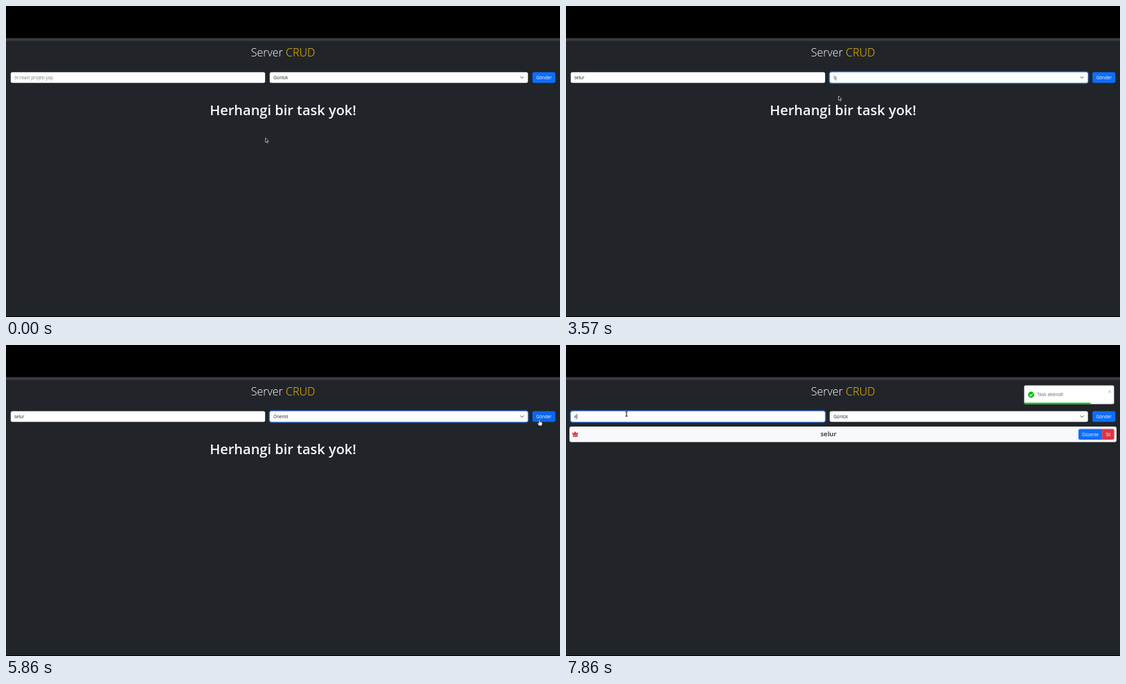
Animation, 800 px wide and 450 px high, one loop 8 s. Source, as an HTML page:

```html
<!DOCTYPE html>
<html lang="tr">
<head>
<meta charset="utf-8">
<title>Server CRUD</title>
<style>
  html, body { margin: 0; width: 100%; height: 100%; overflow: hidden; background: #000; }
  svg { display: block; width: 100vw; height: 100vh; }
  text { font: 400 6.25px "Open Sans", "Noto Sans", sans-serif; fill: #212529; }
  .title { font-size: 16px; font-weight: 300; fill: #fff; }
  .gold { fill: #ffc107; }
  .empty { font-size: 20px; font-weight: 600; fill: #f8f9fa; }
  .task { font-size: 9.6px; font-weight: 600; }
  .light { fill: #fff; }
  .toast { font: 6.6px "Liberation Sans", Arial, sans-serif; fill: #757575; }
  .mid { text-anchor: middle; }
  .ring rect { fill: none; }
  .glow { stroke: #0d6efd; stroke-opacity: .42; stroke-width: 1.8; }
  .edge { stroke: #86b7fe; stroke-width: .6; }
</style>
</head>
<body>
<svg viewBox="0 0 800 450">
  <rect width="800" height="450"/>
  <rect y="46.5" width="800" height="4.5" fill="#3b3a40"/>
  <rect y="50.5" width="800" height="398.5" fill="#212529"/>
  <text class="title mid" x="400" y="73">Server <tspan class="gold">CRUD</tspan></text>

  <g id="inputRing" class="ring">
    <rect class="glow" x="6" y="95" width="369" height="17" rx="3.4"/>
  </g>
  <rect x="6.8" y="95.7" width="367.4" height="15.6" rx="2.5" fill="#fff"/>
  <rect id="inputEdge" class="edge" x="6.9" y="95.8" width="367.2" height="15.4" rx="2.4" fill="none"/>
  <text id="field" x="12" y="105.8"></text>
  <rect id="caret" y="99.6" width=".7" height="7.8" fill="#212529"/>

  <g id="selectRing" class="ring">
    <rect class="glow" x="380" y="95" width="374.5" height="17" rx="3.4"/>
  </g>
  <rect x="380.8" y="95.7" width="372.9" height="15.6" rx="2.5" fill="#fff"/>
  <rect id="selectEdge" class="edge" x="380.9" y="95.8" width="372.7" height="15.4" rx="2.4" fill="none"/>
  <text id="choice" x="386.3" y="105.8"></text>
  <path d="M742.9 102.4l2.2 2.2 2.2-2.2" fill="none" stroke="#343a40" stroke-width=".9" stroke-linecap="round" stroke-linejoin="round"/>

  <rect id="send" x="760.2" y="95.7" width="33.2" height="15.6" rx="2.5"/>
  <text class="light mid" x="776.8" y="105.8">Gönder</text>

  <text id="empty" class="empty mid" x="400" y="158">Herhangi bir task yok!</text>

  <g id="row">
    <rect x="5" y="118" width="790" height="22.4" rx="3" fill="#f8f9fa"/>
    <path d="M9 126.2l2.3 1.6 1.9-3.1 1.9 3.1 2.5-1.6-.8 4.3H9.8zM9.8 131.1h7.1v1.6H9.8z" fill="#dc3545"/>
    <text class="task mid" x="379" y="131.8">selur</text>
    <path d="M774.2 121.5v15.6h-31.7a2.5 2.5 0 0 1-2.5-2.5v-10.6a2.5 2.5 0 0 1 2.5-2.5z" fill="#0d6efd"/>
    <path d="M774.2 121.5v15.6h15a2.5 2.5 0 0 0 2.5-2.5v-10.6a2.5 2.5 0 0 0-2.5-2.5z" fill="#dc3545"/>
    <text class="light mid" x="757.2" y="131.6">Düzenle</text>
    <text class="light mid" x="782.8" y="131.6">Sil</text>
  </g>

  <g id="toast">
    <rect x="661.6" y="58.6" width="129.8" height="26.9" rx="2" fill="#fff"/>
    <circle cx="671.6" cy="72" r="4.4" fill="#07bc0c"/>
    <path d="M669.4 72.1l1.6 1.6 2.9-3.2" fill="none" stroke="#fff" stroke-width="1.1"/>
    <text class="toast" x="680" y="74.3">Task eklendi!</text>
    <path d="M783.2 65.7l3.6 3.6m0-3.6l-3.6 3.6" stroke="#a5a5a5" stroke-width=".8"/>
    <rect id="bar" x="661.8" y="83.5" height="2" fill="#07bc0c"/>
  </g>

  <g id="arrow">
    <path d="M0 0v6.5l1.5-1.3 1 2.2 1.1-.5-1-2.1h2z" fill="#111" stroke="#fff" stroke-width=".6"/>
  </g>
  <g id="beam">
    <path d="M-1.6-3.2H1.6M0-3.2V3.2M-1.6 3.2H1.6" fill="none" stroke="#999" stroke-width="1.7"/>
    <path d="M-1.6-3.2H1.6M0-3.2V3.2M-1.6 3.2H1.6" fill="none" stroke="#333" stroke-width=".7"/>
  </g>
  <g id="hand">
    <path d="M-.7.5Q0-.4.7.5V3L3.6 3.8Q4.3 4.2 4 5.6L3.2 8.4H-.6L-2.6 5.4Q-2.7 4.2-1.7 4.5L-.7 5.4Z" fill="#fff" stroke="#222" stroke-width=".45"/>
  </g>
</svg>
<script>
const LOOP = 8000, FPS = 7;
const $ = id => document.getElementById(id);
const show = (id, on) => $(id).setAttribute('display', on ? 'inline' : 'none');
const place = (id, x, y) => $(id).setAttribute('transform', `translate(${x} ${y})`);

// Pointer stops: time, x, y
const path = [
  [0, 374.7, 190.8], [290, 374.7, 190.8], [860, 150, 107], [1290, 143.5, 110.5],
  [2150, 143.5, 110.5], [2430, 170, 138], [2720, 260, 222], [3000, 386, 106],
  [3140, 388, 106], [3430, 393.5, 130], [3720, 393.5, 130], [4000, 440, 132],
  [4420, 490.8, 119.6], [4700, 506, 105], [4860, 508, 106], [5140, 515, 138],
  [5290, 515, 138], [5720, 770.3, 108.3], [6000, 770.3, 108.3],
  [6600, 86, 100], [6700, 81.8, 98.2], [7140, 81.8, 98.2], [7700, 87.4, 99.8], [LOOP, 87.4, 99.8]
];
const SENT = 5900, TOAST_IN = 700, TOAST_LIFE = 5000, BAR_START = 6550;

function pointer(t) {
  const i = path.findIndex(p => p[0] > t);
  const [a, b] = [path[i - 1], path[i]];
  const u = (t - a[0]) / (b[0] - a[0]), e = u * u * (3 - 2 * u);
  return [a[1] + (b[1] - a[1]) * e, a[2] + (b[2] - a[2]) * e];
}

const inside = (x, y, left, right) => x > left && x < right && y > 95.7 && y < 111.3;
const between = (t, a, b) => t >= a && t < b;

// Bounce from the right: progress, offset
const bounce = [[0, 1230], [.6, -10], [.75, 4], [.9, -2], [1, 0]];
function slide(u) {
  if (u >= 1) return 0;
  const i = bounce.findIndex(b => b[0] > u);
  const [a, b] = [bounce[i - 1], bounce[i]];
  const e = 1 - (1 - (u - a[0]) / (b[0] - a[0])) ** 3;
  return a[1] + (b[1] - a[1]) * e;
}

function typed(t) {
  if (t < SENT) return 'selur'.slice(0, Math.max(0, Math.floor((t - 1560) / 140)));
  return t < 7700 ? '' : 'e';
}

function render(t) {
  const sent = t >= SENT;
  const word = typed(t);
  const field = $('field');
  field.textContent = word || 'ör:react projesi yap';
  field.style.fill = word ? '#212529' : '#74797e';

  const inputFocus = between(t, 860, 3000) || t >= 6690;
  const selectFocus = between(t, 3000, 4000) || between(t, 4700, SENT);
  const inputRing = inputFocus && !between(t, 6690, 6800);
  show('inputRing', inputRing);
  show('inputEdge', inputRing);
  show('selectRing', selectFocus);
  show('selectEdge', selectFocus);

  const blinkFrom = t < 1700 ? 860 : t < 2400 ? t : t < 6690 ? 2400 : t < 7700 ? 6690 : 7700;
  show('caret', inputFocus && (t - blinkFrom) % 1000 < 500);
  $('caret').setAttribute('x', 12 + (word ? field.getComputedTextLength() : 0));

  $('choice').textContent = sent || t < 3430 ? 'Günlük' : t < 5290 ? 'İş' : 'Önemli';
  show('empty', !sent);
  show('row', sent);
  show('toast', sent);
  if (sent) {
    const u = (t - SENT) / TOAST_IN;
    place('toast', slide(u), 0);
    $('toast').setAttribute('opacity', Math.min(1, u / .6));
    $('bar').setAttribute('width', 129.4 * (1 - Math.max(0, t - BAR_START) / TOAST_LIFE));
  }

  const [x, y] = pointer(t);
  const overSend = inside(x, y, 760, 793.5);
  const kind = inside(x, y, 7, 374) ? 'beam' : overSend ? 'hand' : 'arrow';
  for (const id of ['arrow', 'beam', 'hand']) show(id, id === kind);
  place(kind, x, y);
  $('send').setAttribute('fill', overSend ? '#0b66ee' : '#0d6efd');
}

const start = performance.now();
function tick() {
  const t = (performance.now() - start) % LOOP;
  const step = Math.min(Math.floor((t + 5) * FPS / 1000), LOOP * FPS / 1000 - 1);
  render(step * 1000 / FPS);
  requestAnimationFrame(tick);
}
tick();
</script>
</body>
</html>
```
